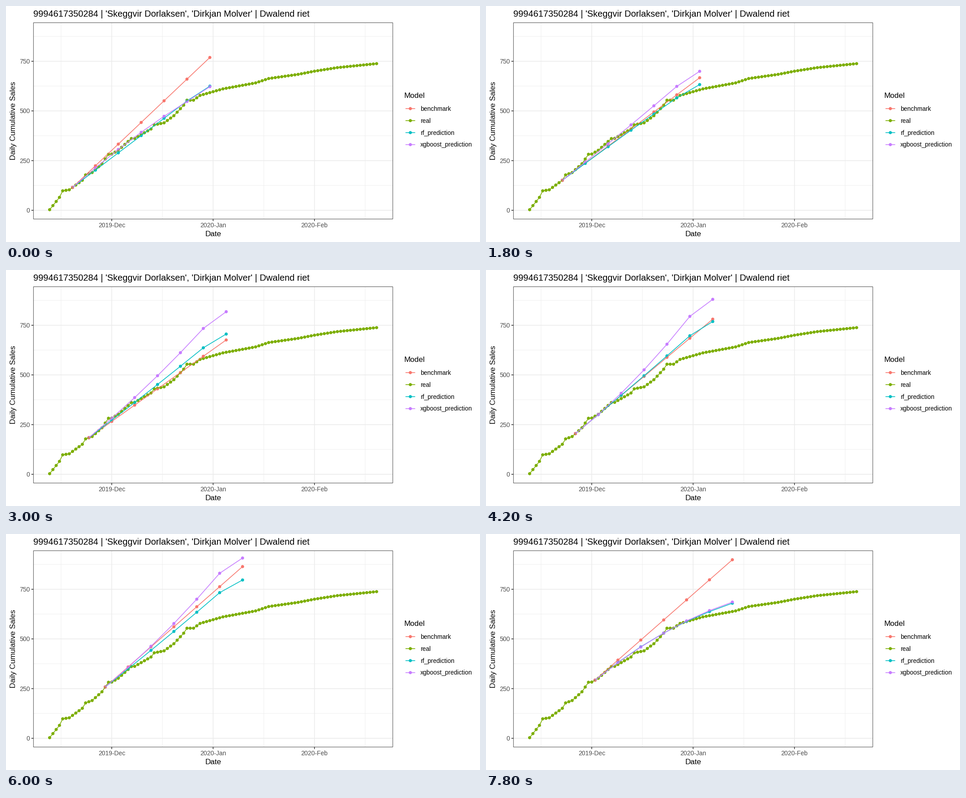
A matplotlib script that plays this animation: 1058 by 529 pixels, repeating every 8 s.

```python
import numpy as np
import matplotlib.pyplot as plt
from matplotlib.animation import FuncAnimation
from matplotlib.patches import Rectangle

W, H, DPI = 1058, 529, 64
PT = 72 / DPI                      # points per pixel
LEFT, RIGHT, TOP, BOTTOM = 60.9, 863.7, 37.1, 477.9
FRAME_MS, HOLD, FRAMES = 200, 3, 40
FIRST_DAY = 7                      # the first forecast starts on this day
WEEK = np.arange(7)

SALMON, GREEN, TEAL, VIOLET = "#F8766D", "#7CAE00", "#00BFC4", "#C77CFF"
INK, GRID, TICK_INK = "#333333", "#EBEBEB", "#4D4D4D"
TITLE = "9994617350284 | 'Skeggvir Dorlaksen', 'Dirkjan Molver' | Dwalend riet"

# Sales curve: straight stretches between turning points (day, total)
TURNS = [(0, 3), (3, 65), (4, 98), (6, 103), (10, 151), (11, 178), (13, 190),
         (16, 234), (18, 282), (19, 283), (21, 302), (25, 361), (26, 362),
         (31, 409), (32, 430), (35, 440), (38, 476), (41, 529), (42, 554),
         (44, 554), (46, 578), (53, 611), (63, 641), (67, 663), (76, 684),
         (81, 700), (88, 718), (100, 738)]
DAYS = np.arange(101)
REAL = np.interp(DAYS, *zip(*TURNS))

# Forecast pace (sales per week) and bend, blended between these steps
STEPS = [0, 3, 5, 7, 9, 11, 13]
BENCH_PACE = [109, 86, 82, 96, 98, 104, 101]
RF_PACE = [87, 83, 90.5, 98.5, 90.5, 99.5, 69]
RF_BEND = [0, 0.5, -0.6, -0.7, -1, -0.8, 5]
XGB_PACE = [86.5, 94.5, 110, 118, 109, 120, 70]
XGB_BEND = [3, -0.8, -3, -5.5, -3.5, -4.5, 4.5]


def px(day):
    return 97.4 + 7.298 * np.asarray(day)


def py(value):
    return 457.9 - 0.4454 * np.asarray(value)


def benchmark(step):
    return np.interp(step, STEPS, BENCH_PACE) * WEEK


def forecast(step, paces, bends):
    """Bent line over five weeks, then a slower sixth week."""
    pace, bend = (np.interp(step, STEPS, v) for v in (paces, bends))
    gain = pace * WEEK + bend * WEEK * (5 - WEEK)
    gain[6] = pace * (5 + 0.86 - 0.019 * step)
    return gain


def rf(step):
    return forecast(step, RF_PACE, RF_BEND)


def xgb(step):
    return forecast(step, XGB_PACE, XGB_BEND)


plt.rcParams["font.family"] = "Liberation Sans"
fig = plt.figure(figsize=(W / DPI, H / DPI), dpi=DPI, facecolor="white")
ax = fig.add_axes([0, 0, 1, 1])
ax.set_xlim(0, W)
ax.set_ylim(H, 0)
ax.axis("off")


def rule(xs, ys, color, width, z=1):
    return ax.plot(xs, ys, color=color, lw=width * PT, zorder=z, snap=False,
                   solid_capstyle="butt", solid_joinstyle="round")[0]


def dots(xs, ys, color, z):
    return ax.scatter(xs, ys, s=(7 * PT) ** 2, color=color,
                      edgecolors="none", zorder=z)


def label(x, y, text, size, color="black", ha="left", **kw):
    ax.text(x, y, text, fontsize=size * PT, color=color, ha=ha,
            va="baseline", **kw)


# Grid, ticks and tick labels
for value in (125, 375, 625, 875):
    rule([LEFT, RIGHT], [py(value)] * 2, GRID, 0.8)
for x in px(19 + 31 * np.arange(-0.5, 3)):
    rule([x, x], [TOP, BOTTOM], GRID, 0.8)
for value in (0, 250, 500, 750):
    y = float(py(value))
    rule([LEFT, RIGHT], [y, y], GRID, 1.6)
    rule([LEFT - 4.2, LEFT], [y, y], INK, 1.6)
    label(53.5, y + 5, str(value), 13.9, TICK_INK, "right")
for day, name in ((19, "2019-Dec"), (50, "2020-Jan"), (81, "2020-Feb")):
    x = float(px(day))
    rule([x, x], [TOP, BOTTOM], GRID, 1.6)
    rule([x, x], [BOTTOM, BOTTOM + 4.2], INK, 1.6)
    label(x, 495.7, name, 13.9, TICK_INK, "center")

# The border shows only its inner half
panel = Rectangle((LEFT, TOP), RIGHT - LEFT, BOTTOM - TOP, visible=False)
ax.add_patch(panel)
ax.add_patch(Rectangle((LEFT + 0.4, TOP + 0.4), RIGHT - LEFT - 0.8,
                       BOTTOM - TOP - 0.8, fill=False, edgecolor=INK,
                       lw=0.9 * PT, snap=False, zorder=20))

# Titles
label(61, 23.5, TITLE, 20)
label(462.3, 515.5, "Date", 17, ha="center")
label(21.5, 257.3, "Daily Cumulative Sales", 17, ha="center", rotation=90,
      rotation_mode="anchor")

# Legend
label(889, 206, "Model", 17)
legend = (("benchmark", SALMON), ("real", GREEN),
          ("rf_prediction", TEAL), ("xgboost_prediction", VIOLET))
for i, (name, color) in enumerate(legend):
    y = 230 + 26.9 * i
    rule([891.7, 913.3], [y, y], color, 1.6, 5)
    dots([902.5], [y], color, 6)
    label(924.8, y + 4.8, name, 13.8)

# Data: lines pass over the dots
dots(px(DAYS), py(REAL), GREEN, 4)
rule(px(DAYS), py(REAL), GREEN, 1.6, 12)

models = []
for i, (color, z, gain) in enumerate(((SALMON, 11, benchmark),
                                      (TEAL, 13, rf), (VIOLET, 14, xgb))):
    line, marks = rule([], [], color, 1.6, z), dots([], [], color, 5 + i)
    line.set_clip_path(panel)
    marks.set_clip_path(panel)
    models.append((line, marks, gain))
start_dot = dots([], [], SALMON, 9)


def update(frame):
    step = frame // HOLD
    day = FIRST_DAY + step
    xs = px(day + 7 * WEEK)
    for line, marks, gain in models:
        ys = py(REAL[day] + gain(step))
        line.set_data(xs, ys)
        marks.set_offsets(np.column_stack([xs, ys]))
    start_dot.set_offsets([[xs[0], ys[0]]])
    return [start_dot]


anim = FuncAnimation(fig, update, frames=FRAMES, init_func=lambda: update(0),
                     interval=FRAME_MS, repeat=True, repeat_delay=0)
plt.show()
```
